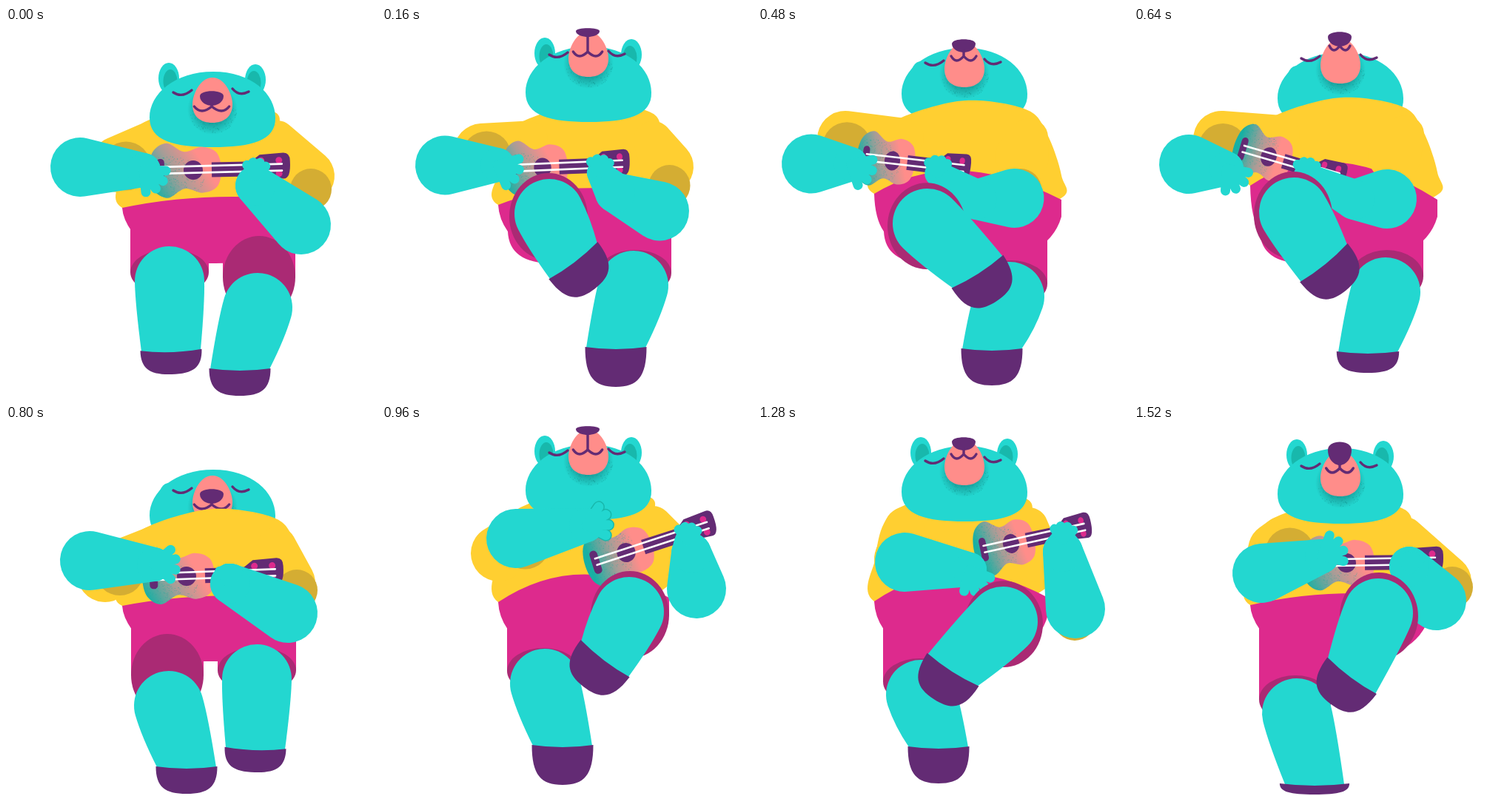
Animation of 500 by 500 pixels, one loop 1600 ms. Source, as an HTML page with a canvas:

```html
<!DOCTYPE html>
<html lang="en">
<head>
<meta charset="utf-8">
<title>Dancing bear with ukulele</title>
<style>
html, body { margin: 0; width: 100%; height: 100%; overflow: hidden; background: #fff; }
canvas { display: block; width: 100vw; height: 100vh; }
</style>
</head>
<body>
<canvas id="stage" width="500" height="500"></canvas>
<script>
const c = document.getElementById('stage').getContext('2d');
const LOOP = 1600, HALF = LOOP / 2, STEP = 80, PI = Math.PI;
const TEAL = '#23d7d0', DEEP = '#18b8ac', YELLOW = '#ffcf31', MUSTARD = '#d4ad33',
  PINK = '#ff8d8a', MAGENTA = '#dd2a8d', PLUM = '#aa2a74', PURPLE = '#632b74';

// Head and legs repeat every half loop (legs mirrored); arms and body take the whole loop.
const BEATS = [0, 160, 320, 480, 640, 720];
const TIMES = [0, 320, 640, 800, 960, 1280, 1520];

// top, muzzle bottom, nose y, nose height, mouth y, eye y
const head = [
  [59, 128, 95, 10, 109, 89], [25, 66, 6, 6, 35, 38], [48, 89, 32, 7, 46, 60],
  [27, 80, 24, 9, 41, 49], [33, 75, 15, 10, 27, 43], [30, 95, 37, 16, 60, 56]];
// knee x, y; foot x, y; foot angle
const lift = [
  [221, 342, 223, 436, 1.54], [226, 251, 259, 315, .92], [211, 252, 262, 312, .45],
  [229, 264, 297, 330, 1], [216, 249, 257, 318, .89], [230, 253, 266, 338, .93]];
// knee y, foot y, shoe depth, cuff above knee
const stand = [
  [378, 461, 36, 51], [348, 432, 53, 2], [376, 482, 17, 12],
  [363, 434, 49, 3], [357, 438, 28, 11], [388, 484, 14, 5]];

// shoulder y, right side x, hem y, hem bulge y
const body = [
  [127, 390, 243, 220], [128, 410, 235, 175], [120, 410, 213, 140], [138, 410, 243, 222],
  [110, 388, 238, 166], [112, 392, 237, 163], [125, 400, 242, 216]];
// elbow, wrist, finger angle, sleeve
const strum = [
  [100, 188, 186, 192, .75, 152, 184], [70, 183, 126, 178, .15, 118, 150],
  [74, 184, 125, 190, .9, 118, 150], [113, 182, 200, 187, 0, 134, 200],
  [181, 152, 276, 134, -.25, 158, 172], [198, 184, 286, 194, 1.1, 195, 180],
  [173, 199, 254, 176, -.5, 192, 168]];
// elbow, wrist, sleeve, lining
const fret = [
  [399, 266, 337, 213, 408, 200, 412, 218], [351, 229, 293, 232, 362, 175, 365, 208],
  [342, 231, 298, 232, 352, 172, 345, 228], [381, 253, 303, 213, 382, 212, 393, 222],
  [425, 220, 418, 172, 378, 160, 424, 220], [429, 247, 412, 170, 372, 175, 428, 262],
  [409, 236, 372, 190, 420, 210, 430, 218]];
// sound hole x, y; angle; foreshortening; fretting hand along the neck
const uke = [
  [253, 192, -.02, 1, 84], [181, 185, -.05, .8, 86], [182, 174, .29, .82, 68], [244, 203, -.03, 1, 56],
  [330, 171, -.31, .97, 86], [342, 159, -.21, .85, 82], [287, 185, -.01, 1, 86]];

// One leg over the loop: raised for the first half, carrying the weight for the second.
// knee, foot, foot angle, shoe depth, cuff x, y, rx, ry
const leg = [
  ...lift.map(([kx, ky, fx, fy, a]) => {
    const up = Math.min(1, (342 - ky) / 80);
    return [kx, ky, fx, fy, a, 32 + 15 * up, kx - up, ky - 12 + 16 * up, 53, 31 + 28 * up];
  }),
  ...stand.map(([ky, fy, depth, above]) => {
    const ry = 30 + above / 2;
    return [220, ky, 244, fy, PI / 2, depth, 218, ky - 46 - above + ry, 49, ry];
  })];
const legTimes = [...BEATS, ...BEATS.map(t => t + HALF)];
const flip = ([kx, ky, fx, fy, a, d, cx, ...rest]) => [560 - kx, ky, 560 - fx, fy, PI - a, d, 560 - cx, ...rest];

function pose(rows, times, span, time) {
  const t = time % span;
  let i = times.length - 1;
  while (times[i] > t) i--;
  const next = (i + 1) % times.length;
  const k = (t - times[i]) / ((times[next] || span) - times[i]);
  return rows[i].map((v, j) => v + (rows[next][j] - v) * k);
}

function fill(color, draw) {
  c.beginPath();
  draw();
  c.fillStyle = color;
  c.fill();
}
function line(color, width, draw) {
  c.beginPath();
  draw();
  c.strokeStyle = color;
  c.lineWidth = width;
  c.stroke();
}
const oval = (color, x, y, rx, ry = rx) => fill(color, () => c.ellipse(x, y, rx, ry, 0, 0, 7));

// Two circles and the band between them.
function limb(color, x1, y1, r1, x2, y2, r2) {
  const dx = x2 - x1, dy = y2 - y1, a = Math.atan2(dy, dx);
  const k = Math.acos(Math.max(-1, Math.min(1, (r1 - r2) / (Math.hypot(dx, dy) || 1))));
  fill(color, () => {
    c.arc(x1, y1, r1, a + k, a - k + 2 * PI);
    c.arc(x2, y2, r2, a - k, a + k);
  });
}

// Closed smooth curve through points.
function smooth(p) {
  const n = p.length, at = i => p[(i + n) % n];
  c.moveTo(...p[0]);
  for (let i = 0; i < n; i++) {
    const ctl = (a, s) => [0, 1].map(k => at(a)[k] + s * (at(a + 1)[k] - at(a - 1)[k]) / 6);
    c.bezierCurveTo(...ctl(i, 1), ...ctl(i + 1, -1), ...at(i + 1));
  }
}

function grain(color, x, y, rx, ry, count) {
  let seed = 7;
  const rnd = () => (seed = seed * 16807 % 2147483647) / 2147483647;
  c.fillStyle = color;
  for (let i = 0; i < count; i++) {
    const a = rnd() * 2 * PI, d = Math.sqrt(rnd());
    c.fillRect(x + Math.cos(a) * d * rx, y + Math.sin(a) * d * ry, 1, 1);
  }
}

function drawHead([top, muzzle, nose, nh, mouth, eye], tucked) {
  const ear = top + (tucked ? 40 : 10), wide = top + 62, chin = top + 102, low = chin - 8;
  for (const [x, s] of [[220, 1], [337, -1]]) {
    oval(TEAL, x, ear - s, 14, 21);
    oval(DEEP, x + 2 * s, ear + 4 - s, 9.5, 16);
  }
  c.save();
  fill(TEAL, () => {
    c.moveTo(194, wide);
    c.bezierCurveTo(194, wide - 32, 228, top, 280, top);
    c.bezierCurveTo(332, top, 364, wide - 32, 364, wide);
    c.bezierCurveTo(365, low, 330, chin, 280, chin);
    c.bezierCurveTo(228, chin, 194, low, 194, wide);
  });
  c.clip();
  const beard = c.createRadialGradient(279, muzzle - 18, 20, 279, muzzle - 18, 34);
  beard.addColorStop(0, '#178f8caa');
  beard.addColorStop(1, '#178f8c00');
  oval(beard, 279, muzzle - 18, 34);
  grain('#178f8c77', 279, muzzle - 11, 32, 25, 260);
  c.restore();

  fill(PINK, () => {
    c.moveTo(279, muzzle - 61);
    c.bezierCurveTo(296, muzzle - 61, 306, muzzle - 38, 306, muzzle - 25);
    c.bezierCurveTo(306, muzzle - 8, 294, muzzle, 279, muzzle);
    c.bezierCurveTo(263, muzzle, 252, muzzle - 8, 252, muzzle - 25);
    c.bezierCurveTo(252, muzzle - 38, 262, muzzle - 61, 279, muzzle - 61);
  });
  const brim = nose - nh * .3, arch = nose - nh * 1.2, tip = nose + nh, side = nose + nh * .6;
  fill(PURPLE, () => {
    c.moveTo(262, brim);
    c.bezierCurveTo(262, arch, 294, arch, 294, brim);
    c.bezierCurveTo(294, side, 284, tip, 278, tip);
    c.bezierCurveTo(272, tip, 262, side, 262, brim);
  });
  // The mouth narrows as the head tips back.
  const mw = 30 - (muzzle - mouth) / 3, lip = mouth - 3, sag = mouth + 9;
  line(PURPLE, 3.4, () => {
    c.moveTo(278, tip - 2);
    c.lineTo(278, lip);
    c.moveTo(278 - mw, lip);
    c.quadraticCurveTo(278 - mw * .6, sag, 278, lip);
    c.quadraticCurveTo(278 + mw * .6, sag, 278 + mw, lip);
    c.moveTo(226, eye - 2);
    c.quadraticCurveTo(238, eye + 6, 251, eye - 5);
    c.moveTo(306, eye - 7);
    c.quadraticCurveTo(315, eye + 4, 328, eye - 3);
  });
}

function drawClothes([top, right, hem, bulge], legs, left, arm) {
  fill(YELLOW, () => smooth([
    [157, hem], [159, top + 65], [170, top + 20], [196, top - 4], [280, top - 26], [362, top - 14],
    [right - 20, top + 18], [right, top + 75], [right - 4, top + 108], [280, 265]]));
  fill(MAGENTA, () => {
    c.moveTo(157, hem);
    c.quadraticCurveTo(265, bulge, right, 232);
    c.lineTo(right, 255);
    c.quadraticCurveTo(right - 18, 318, 283, 318);
    c.lineTo(230, 318);
    c.quadraticCurveTo(172, 318, 170, 275);
    c.quadraticCurveTo(158, 258, 157, hem);
  });
  for (const [, , , , , , x, y, rx] of legs) fill(MAGENTA, () => c.rect(x - rx, 270, 2 * rx, y - 270));

  const [, , wx, wy, , sx, sy] = left, [, , , , rx, ry, lx, ly] = arm;
  limb(YELLOW, 198, top + 24, 26, sx, sy, 38);
  oval(MUSTARD, sx + (wx - sx) * .3, sy + (wy - sy) * .3, 33);
  limb(YELLOW, 366, top + 24, 26, rx, ry, 36);
  oval(MUSTARD, lx, ly, 28);
}

function drawLeg([kx, ky, fx, fy, angle, depth, cx, cy, rx, ry]) {
  oval(PLUM, cx, cy, rx, ry);
  const dir = Math.atan2(fy - ky, fx - kx), r = 47;
  const nx = Math.cos(angle), ny = Math.sin(angle);
  // Point on the foot: along the sole, then out from the ankle.
  const foot = (u, v) => [fx + u * ny + v * nx, fy - u * nx + v * ny];
  const knee = (side, down) => [
    kx - side * r * Math.sin(dir) + down * Math.cos(dir), ky + side * r * Math.cos(dir) + down * Math.sin(dir)];
  fill(TEAL, () => {
    c.moveTo(...foot(-40, 0));
    c.quadraticCurveTo(...knee(1, 30), ...knee(1, 0));
    c.arc(kx, ky, r, dir + PI / 2, dir + PI * 1.5);
    c.quadraticCurveTo(...knee(-1, 30), ...foot(40, 0));
    c.lineTo(...foot(37, 6));
    c.lineTo(...foot(-37, 6));
  });
  const w = 41.5 + Math.max(0, 30 - depth) * .35;
  fill(PURPLE, () => {
    c.moveTo(...foot(-w, -1));
    c.quadraticCurveTo(...foot(0, 5), ...foot(w, -1));
    c.bezierCurveTo(...foot(w, depth * .75), ...foot(w * .7, depth), ...foot(0, depth));
    c.bezierCurveTo(...foot(-w * .7, depth), ...foot(-w, depth * .75), ...foot(-w, -1));
  });
}

function drawArm(ex, ey, wx, wy, wr, hx, hy, dir, reach) {
  const fingers = () => {
    for (let i = -1.5; i < 2; i++) {
      const a = dir + i * .48;
      c.moveTo(hx, hy);
      c.lineTo(hx + Math.cos(a) * reach, hy + Math.sin(a) * reach);
    }
  };
  // Fingers need an edge where they cross the chin.
  if (hy < 150 && hx < 300) line(DEEP, 16, fingers);
  limb(TEAL, ex, ey, 40, wx, wy, wr);
  limb(TEAL, wx, wy, wr, hx, hy, 17);
  line(TEAL, 13, fingers);
}

const mirror = top => [...top, ...top.slice(1, -1).reverse().map(([x, y]) => [x, -y])];
const ukeBody = mirror([[-60, 0], [-54, -26], [-35, -37], [-12, -25], [12, -31], [32, -23], [38, 0]]);

function drawUke([x, y, angle, sx]) {
  const shade = 35 * (1 - 4 * Math.abs(angle));
  c.save();
  c.translate(x, y);
  c.rotate(angle);
  c.scale(sx, 1);
  const tint = c.createLinearGradient(-52, shade, 14, -8);
  tint.addColorStop(0, '#18b0a4');
  tint.addColorStop(.5, '#a59d97');
  tint.addColorStop(1, PINK);
  fill(tint, () => smooth(ukeBody));
  c.save();
  c.clip();
  grain('#18a89c77', -34, shade / 2, 48, 36, 350);
  c.restore();
  oval(PURPLE, 0, 0, 13);
  fill(PURPLE, () => c.roundRect(-50, -16, 11, 32, 5));
  fill(PURPLE, () => c.rect(25, -10, 60, 20));
  fill(PURPLE, () => {
    c.moveTo(78, -10);
    c.lineTo(90, -19);
    c.lineTo(122, -21);
    c.quadraticCurveTo(131, -21, 131, -10);
    c.quadraticCurveTo(132, 14, 122, 14);
    c.lineTo(78, 10);
  });
  for (const u of [92, 116]) for (const v of [-11, 7]) oval(MAGENTA, u, v, 4.5);
  line('#fff', 2.6, () => {
    for (const v of [-5, 4]) {
      c.moveTo(-44, v);
      c.lineTo(120, v - 1);
    }
  });
  c.restore();
}

function draw(t) {
  c.fillStyle = '#fff';
  c.fillRect(0, 0, 500, 500);
  c.lineCap = c.lineJoin = 'round';
  const face = pose(head, BEATS, HALF, t);
  const legs = [pose(leg, legTimes, LOOP, t), flip(pose(leg, legTimes, LOOP, t + HALF))];
  const [shirt, left, right, guitar] = [body, strum, fret, uke].map(rows => pose(rows, TIMES, LOOP, t));
  const raised = l => l[1] < 300, down = legs.filter(l => !raised(l));
  const tucked = t >= 240 && t < 900;

  if (tucked) drawHead(face, tucked);
  drawClothes(shirt, down, left, right);
  down.forEach(drawLeg);
  if (!tucked) drawHead(face, tucked);
  drawUke(guitar);

  const [ux, uy, angle, scale, along] = guitar, sin = Math.sin(angle), cos = Math.cos(angle);
  const hx = ux + along * scale * cos - 10 * sin, hy = uy + along * scale * sin + 10 * cos;
  drawArm(...right.slice(0, 4), 27, hx, hy, -1.5, 19);
  const [ex, ey, wx, wy, dir] = left;
  drawArm(ex, ey, wx, wy, 23, wx, wy, dir, 30);
  legs.filter(raised).forEach(drawLeg);
}

function tick() {
  const t = performance.now() % LOOP;
  draw(Math.floor(t / STEP) * STEP);
  requestAnimationFrame(tick);
}
tick();
</script>
</body>
</html>
```
